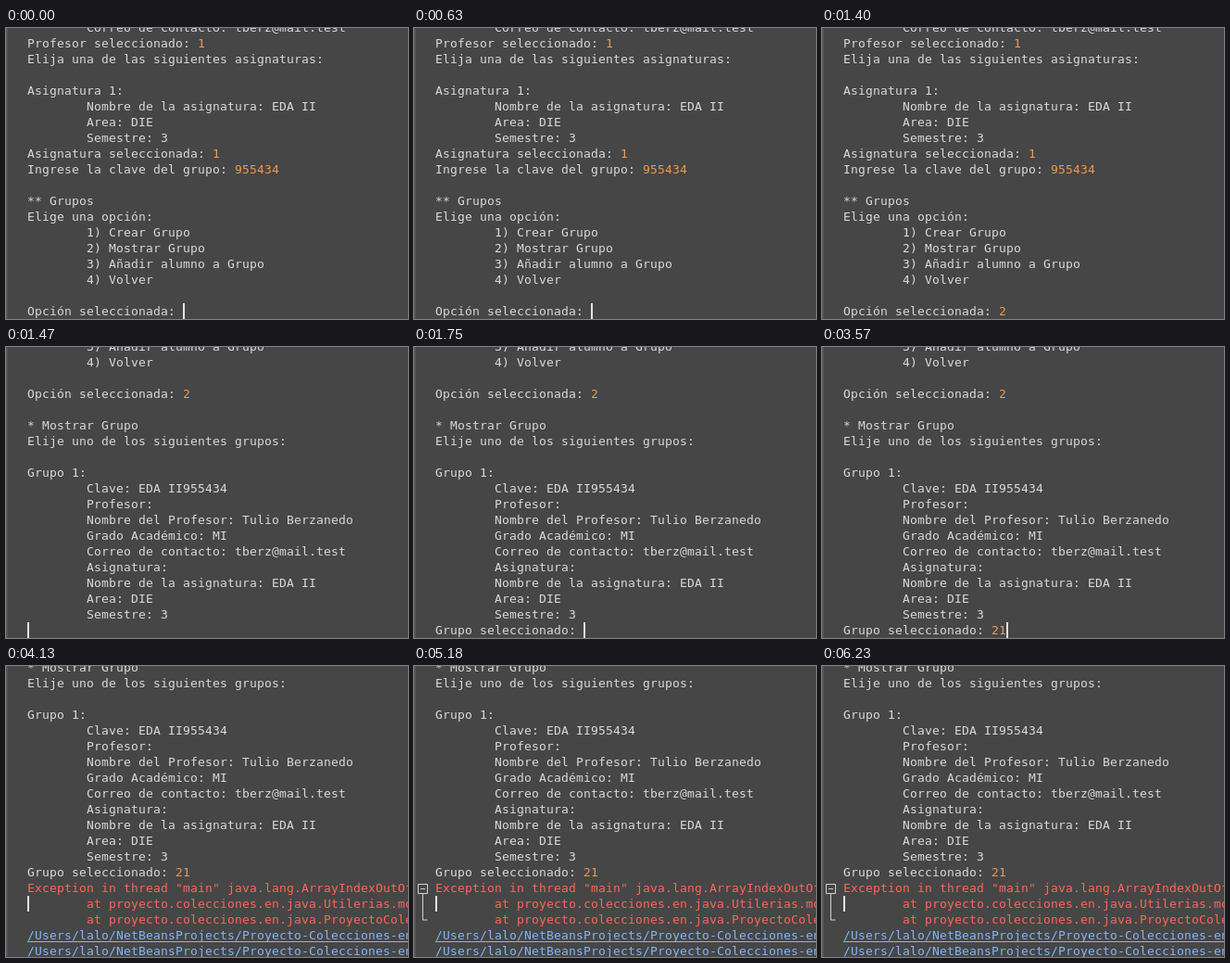
Recreate the animation shown at these times as an HTML page. Size 434 by 314 pixels, loop 6.65 s.

```html
<!DOCTYPE html>
<html lang="es">
<head>
<meta charset="utf-8">
<title>Consola</title>
<style>
html, body { margin: 0; width: 100%; height: 100%; overflow: hidden; background: #464646; }
#stage { position: relative; width: 434px; height: 314px; overflow: hidden; background: #464646; }
#stage > * { position: absolute; }
#edge { left: 0; top: 0; width: 2px; height: 314px; background: #565656; }
pre { left: 23px; margin: 0; color: #dadada; font: 13px/17px "DejaVu Sans Mono", monospace; font-variant-ligatures: none; }
b { font-weight: normal; color: #ec9a50; }
.err { color: #ff6557; }
u { color: #80b6f6; text-decoration: underline 1px; text-underline-offset: 2px; text-decoration-skip-ink: none; }
#caret { width: 2px; height: 17px; background: #e2e2e2; }
#fold { left: 0; top: 230px; fill: none; stroke: #d2d2d2; }
</style>
</head>
<body>
<div id="stage">
<div id="edge"></div>
<pre id="log">
        Correo de contacto: tberz@mail.test
Profesor seleccionado: <b>1</b>
Elija una de las siguientes asignaturas:

Asignatura 1:
        Nombre de la asignatura: EDA II
        Area: DIE
        Semestre: 3
Asignatura seleccionada: <b>1</b>
Ingrese la clave del grupo: <b>955434</b>

** Grupos
Elige una opción:
        1) Crear Grupo
        2) Mostrar Grupo
        3) Añadir alumno a Grupo
        4) Volver

Opción seleccionada: <b id="option"></b>

* Mostrar Grupo
Elije uno de los siguientes grupos:

Grupo 1:
        Clave: EDA II955434
        Profesor:
        Nombre del Profesor: Tulio Berzanedo
        Grado Académico: MI
        Correo de contacto: tberz@mail.test
        Asignatura:
        Nombre de la asignatura: EDA II
        Area: DIE
        Semestre: 3
<span id="prompt">Grupo seleccionado: </span><b id="group"></b>
<span class="err">Exception in thread "main" java.lang.ArrayIndexOutOfBoundsException: 20
        at proyecto.colecciones.en.java.Utilerias.mostrarGrupo(Utilerias.java)
        at proyecto.colecciones.en.java.ProyectoColeccionesEnJava.main(Main.java)</span>
<u>/Users/lalo/NetBeansProjects/Proyecto-Colecciones-en-Java/nbproject/build.xml</u>
<u>/Users/lalo/NetBeansProjects/Proyecto-Colecciones-en-Java/nbproject/build.xml</u>
</pre>
<svg id="fold" width="16" height="50"><path d="M4.5 5.5h10v10h-10zM7 10.5h5M9.5 15.5v28.5h5"/></svg>
<div id="caret"></div>
</div>
<script>
const LOOP = 6650, CELL = 8, LEFT = 23;
const $ = id => document.getElementById(id);
const log = $("log"), option = $("option"), prompt = $("prompt"), group = $("group");
const caret = $("caret"), fold = $("fold");

// Snap the font to the console's character grid.
const chars = prompt.textContent.length;
log.style.letterSpacing = CELL - prompt.getBoundingClientRect().width / chars + "px";

const MENU = -9, LIST = -264, ERROR = -347;
const HIDDEN = -1;

// start ms, log top, typed option, prompt shown, typed group, caret column
const steps = [
  [0, MENU, "", 0, "", 21],
  [70, MENU, "", 0, "", HIDDEN],
  [560, MENU, "", 0, "", 21],
  [840, MENU, "2", 0, "", 22],
  [1260, MENU, "2", 0, "", HIDDEN],
  [1470, LIST, "2", 0, "", 0],
  [1750, LIST, "2", 1, "", 20],
  [2240, LIST, "2", 1, "", HIDDEN],
  [2730, LIST, "2", 1, "", 20],
  [3290, LIST, "2", 1, "", HIDDEN],
  [3500, LIST, "2", 1, "2", 21],
  [3570, LIST, "2", 1, "21", 22],
  [4130, ERROR, "2", 1, "21", 0],
  [4690, ERROR, "2", 1, "21", HIDDEN],
  [5180, ERROR, "2", 1, "21", 0],
  [5740, ERROR, "2", 1, "21", HIDDEN],
  [6230, ERROR, "2", 1, "21", 0],
];

const show = (el, on) => { el.style.visibility = on ? "visible" : "hidden"; };

function draw(t) {
  const [, top, picked, prompted, typed, column] = steps.findLast(s => s[0] <= t);
  log.style.top = top + "px";
  option.textContent = picked;
  group.textContent = typed;
  show(prompt, prompted);
  show(fold, t >= 4200);
  show(caret, column !== HIDDEN);
  caret.style.left = LEFT + column * CELL + "px";
  caret.style.top = (top === ERROR ? 248 : 297) + "px";
}

const start = performance.now();
function tick() {
  draw((performance.now() - start) % LOOP);
  requestAnimationFrame(tick);
}
tick();
</script>
</body>
</html>
```
